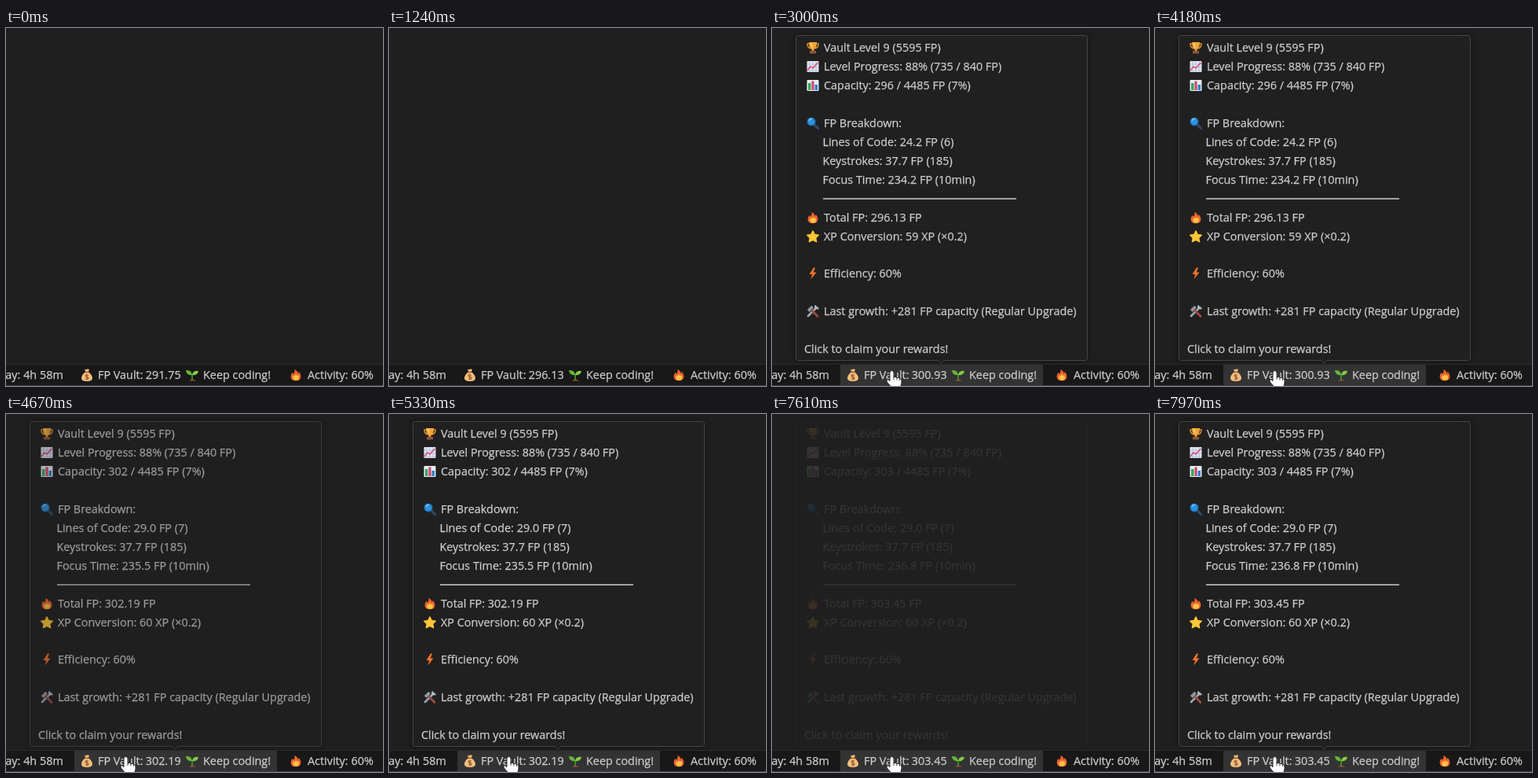
Recreate the animation shown at these times as an HTML page. Size 480 by 455 pixels, loop 8 s.

```html
<!DOCTYPE html>
<html lang="en">
<head>
<meta charset="utf-8">
<title>Focus vault status bar</title>
<style>
  html, body { margin: 0; width: 100%; height: 100%; overflow: hidden; background: #1f1f1f; }
  svg { display: block; }
  text { font: 14.4px "Open Sans", "Noto Sans", sans-serif; fill: #ccc; stroke: #ccc; stroke-width: .25; white-space: pre; }
  #panel { filter: drop-shadow(0 0 4px rgba(0, 0, 0, .36)); }
</style>
</head>
<body>
<svg width="480" height="455" viewBox="0 0 480 455">
  <defs>
    <!-- Icons are drawn around their own centre, about 16 units wide -->
    <g id="trophy">
      <path d="M-4-5H-7Q-7 0-3 1M4-5H7Q7 0 3 1" fill="none" stroke="#d98d2b" stroke-width="1.5"/>
      <path d="M-5-7H5Q5 1 1.3 2.5V5H-1.3V2.5Q-5 1-5-7Z" fill="#f0a43a"/>
      <path d="M-3-6H-1Q-1-1 0 1Q-3-1-3-6Z" fill="#ffd071"/>
      <path d="M-4 4H4V7.5H-4Z" fill="#8c5638"/>
    </g>
    <g id="trend">
      <rect x="-7.5" y="-7" width="15" height="14" rx="1" fill="#e4e7f2"/>
      <path d="M-7-3H7M-7 1H7M-7 5H7M-4-7V7M0-7V7M4-7V7" stroke="#a9b9d8" stroke-width=".8"/>
      <path d="M-7 5L-3 0L0 2L6.5-5" fill="none" stroke="#d6486c" stroke-width="1.4"/>
    </g>
    <g id="bars">
      <rect x="-7.5" y="-7" width="15" height="14" rx="1" fill="#e8edf3"/>
      <path d="M-6-3H-2.5V6H-6Z" fill="#35a95b"/>
      <path d="M-1.6-5.5H1.6V6H-1.6Z" fill="#d94470"/>
      <path d="M2.5-1H6V6H2.5Z" fill="#2d82cf"/>
    </g>
    <g id="lens">
      <path d="M2 2L6.5 6.5" stroke="#33475e" stroke-width="3.2" stroke-linecap="round"/>
      <circle cx="-2" cy="-2" r="5" fill="#2c92dc" stroke="#1c68ad" stroke-width="1.2"/>
      <path d="M-5-3Q-4-6-1-5.5" fill="none" stroke="#91d0ff" stroke-width="1.2"/>
    </g>
    <g id="flame" transform="scale(.92)">
      <path d="M-1.5-8Q3-5 3-2Q4-3 4-4.5Q7-1 7 2Q7 8 0 8Q-7 8-7 2Q-7-1-4.5-3.5Q-4-1.5-3-1.5Q-1-4-1.5-8Z" fill="#f0642b"/>
      <path d="M0-2Q0 1 2 1Q3 1 3-.5Q5 2 4.3 4.5Q3.4 7.4 0 7.4Q-4 7.2-4 3.5Q-4 1.5-2.5 0L-2 1.5Q0 0 0-2Z" fill="#ffc247"/>
    </g>
    <path id="star" d="M0-7L2.2-2.5L7.2-1.8L3.6 1.7L4.5 6.6L0 4.3L-4.5 6.6L-3.6 1.7L-7.2-1.8L-2.2-2.5Z"
          fill="#fcc735" stroke="#fcc735" stroke-width="1.6" stroke-linejoin="round"/>
    <path id="bolt" d="M1-7.5L-4.5 1H-.8L-2.5 7.5L4.5-1.5H.8L3-7.5Z" fill="#f4722b"/>
    <g id="tools">
      <path d="M5-5L-6 6" stroke="#9ba8b3" stroke-width="2.6" stroke-linecap="round"/>
      <path d="M3-7.5L3.5-4L7.5-3.4" fill="none" stroke="#b8c2ca" stroke-width="2"/>
      <path d="M-3-3L6 6.5" stroke="#a64b45" stroke-width="2.6" stroke-linecap="round"/>
      <path d="M-7-2L-2-7L1-5L-4.5 1Z" fill="#8d9aa4"/>
    </g>
    <g id="money">
      <path d="M-3-7.5L-1-6.8L1-7.8L3-7L1.8-4Q7 0 7 4Q7 8 0 8Q-7 8-7 4Q-7 0-1.8-4Z" fill="#f2bf7c"/>
      <path d="M-2.6-3.6H2.6" stroke="#a85b35" stroke-width="1.6"/>
      <path d="M2 .2Q-2-1-2 1Q-2 2.2 0 2.4Q2 2.7 2 4Q2 6-2 4.8M0-1V6.5" fill="none" stroke="#985631" stroke-width="1.1"/>
    </g>
    <g id="sprout">
      <path d="M-4 7.5Q0 3.5 5 7.5Z" fill="#915139"/>
      <path d="M0 6V-1" stroke="#45982f" stroke-width="1.7"/>
      <path d="M0 0Q-7 1-8-6Q-1-7 0 0Z" fill="#67b737"/>
      <path d="M0 0Q1-6 8-5Q7 1 0 0Z" fill="#83cd40"/>
    </g>
  </defs>

  <rect width="480" height="455" fill="#1f1f1f"/>
  <rect y="427" width="480" height="28" fill="#181818"/>
  <path d="M0 427.5H480" stroke="#2b2b2b"/>
  <rect id="leftHover" y="428" width="80" height="26" fill="#333"/>
  <rect id="vaultHover" x="87" y="428" width="258" height="26" fill="#333"/>
  <path d="M0 454.5H480" stroke="#4b4046"/>
  <text x="-.7" y="446">ay: 4h 58m</text>
  <use href="#money" x="103" y="441"/>
  <text x="117" y="446">FP Vault:</text>
  <text id="vault" x="177.7" y="446"></text>
  <use href="#sprout" x="237" y="441"/>
  <text x="251" y="446">Keep coding!</text>
  <use href="#flame" x="369" y="441"/>
  <text x="384" y="446">Activity: 60%</text>

  <g id="tooltip">
    <g id="panel" fill="#202020" stroke="#454545">
      <rect x="30.5" y="9.5" width="371" height="413" rx="3"/>
      <path d="M210.5 422L215 426.5L219.5 422"/>
    </g>
    <g id="rows"></g>
  </g>

  <g id="cursor" stroke="#222">
    <path d="M-2.5 2Q-2.5-.5 0-.5Q2.5-.5 2.5 2V8Q5 6.5 6.5 8.6Q9 7.5 10 9.6Q12.5 9 12.5 12V15Q12.5 18 10.5 20V23H-.5V20.5L-6 14Q-7.5 11.5-5.5 10.8Q-4.3 10.5-2.5 12.5Z" fill="#fff"/>
    <path d="M2.5 7.5V11M6.4 8.6V11.5M9.9 9.6V12" stroke-width=".8"/>
  </g>
</svg>
<script>
const LOOP = 8000;
const $ = id => document.getElementById(id);

const vaultSteps = [[0, '291.75'], [450, '296.13'], [1500, '300.93'], [4600, '302.19'], [7600, '303.45']];
const reports = [
  { at: 2380, fade: 200, lines: '24.2 FP (6)', focus: '234.2', total: '296.13', xp: 59 },
  { at: 4600, fade: 100, lines: '29.0 FP (7)', focus: '235.5', total: '302.19', xp: 60 },
  { at: 7600, fade: 100, lines: '29.0 FP (7)', focus: '236.8', total: '303.45', xp: 60 },
];
// Pointer route: time, x, y
const route = [[1750, 20, 458], [1880, 60, 447], [2150, 136.5, 432.5], [2240, 136.5, 432.5], [2450, 152.5, 436]];

// Each row: line index, icon or null, text, optional x
const tooltipRows = r => [
  [0, 'trophy', 'Vault Level 9 (5595 FP)'],
  [1, 'trend', 'Level Progress: 88% (735 / 840 FP)'],
  [2, 'bars', `Capacity: ${Math.round(r.total)} / 4485 FP (7%)`],
  [4, 'lens', 'FP Breakdown:'],
  [5, null, `Lines of Code: ${r.lines}`],
  [6, null, 'Keystrokes: 37.7 FP (185)'],
  [7, null, `Focus Time: ${r.focus} FP (10min)`],
  [9, 'flame', `Total FP: ${r.total} FP`],
  [10, 'star', `XP Conversion: ${r.xp} XP (×0.2)`],
  [12, 'bolt', 'Efficiency: 60%'],
  [14, 'tools', 'Last growth: +281 FP capacity (Regular Upgrade)'],
  [16, null, 'Click to claim your rewards!', 41],
];

function renderRows(report) {
  const rows = tooltipRows(report).map(([line, icon, label, x = icon ? 66 : 64.5]) => {
    const y = Math.round(25 + line * 23.953);
    const mark = icon ? `<use href="#${icon}" x="52" y="${y}"/>` : '';
    return `${mark}<text x="${x}" y="${y + 5}">${label}</text>`;
  });
  $('rows').innerHTML = rows.join('') + '<path d="M65 217H311" stroke="#ccc" stroke-width="1.6"/>';
}

function pointerAt(t) {
  const i = route.findIndex(([at]) => at > t);
  if (i === 0) return null;
  if (i < 0) return route.at(-1).slice(1);
  const [t0, x0, y0] = route[i - 1], [t1, x1, y1] = route[i];
  const p = (t - t0) / (t1 - t0);
  return [x0 + (x1 - x0) * p, y0 + (y1 - y0) * p];
}

const show = (id, visible) => $(id).setAttribute('visibility', visible ? 'visible' : 'hidden');
let shownReport;

function draw() {
  const t = performance.now() % LOOP;
  $('vault').textContent = vaultSteps.findLast(([at]) => t >= at)[1];

  const pointer = pointerAt(t);
  show('cursor', pointer);
  show('leftHover', pointer && pointer[0] < 83);
  show('vaultHover', pointer && pointer[0] >= 83);
  if (pointer) $('cursor').setAttribute('transform', `translate(${pointer})`);

  const report = reports.findLast(r => t >= r.at);
  if (report && report !== shownReport) renderRows(report);
  shownReport = report;
  $('tooltip').setAttribute('opacity', report ? Math.min(1, (t - report.at) / report.fade) : 0);
  requestAnimationFrame(draw);
}
draw();
</script>
</body>
</html>
```
